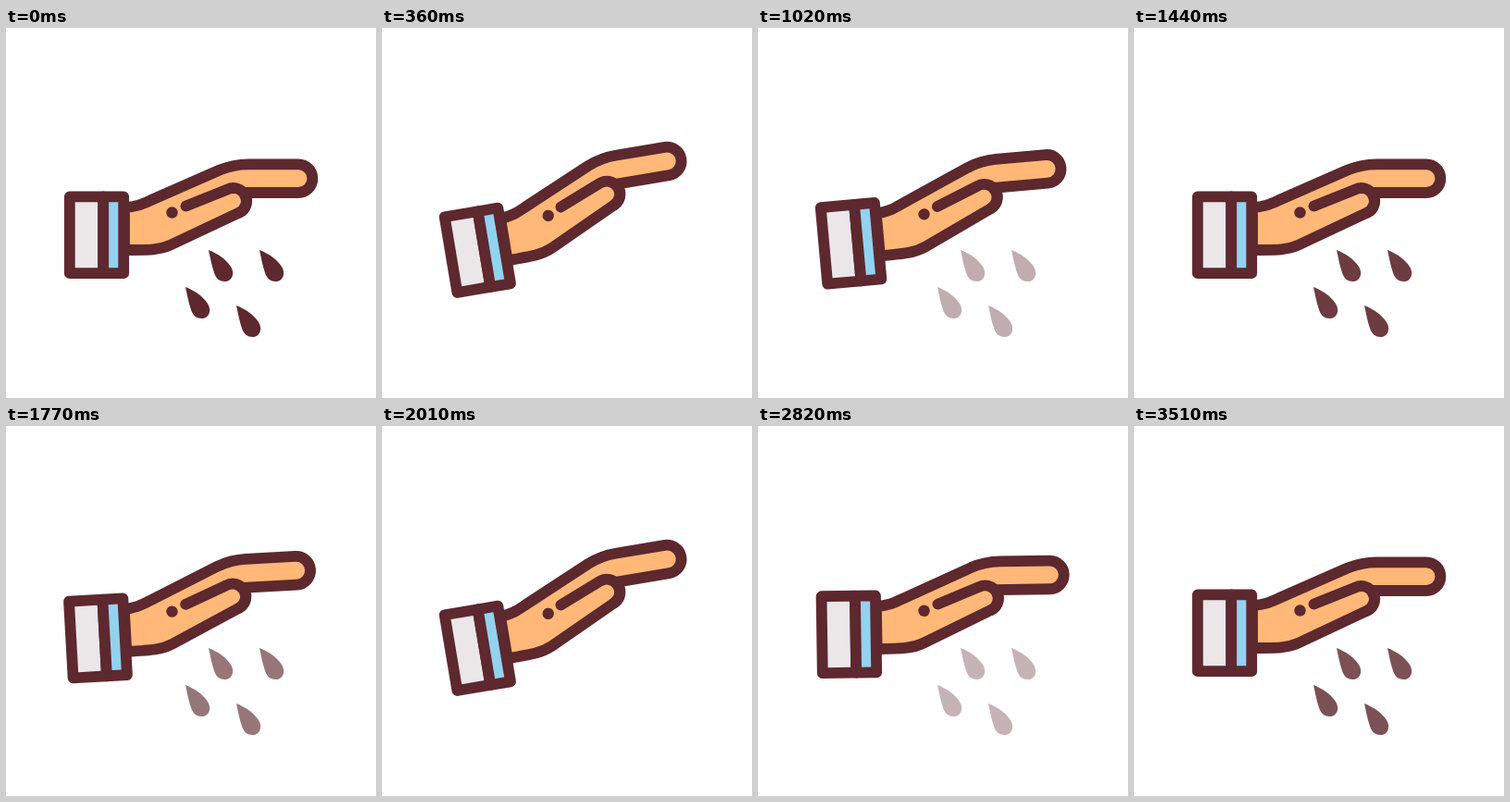
Recreate the animation shown at these times as an HTML page. Size 400 by 400 pixels, loop 3600 ms.

```html
<!DOCTYPE html>
<html lang="en">
<head>
<meta charset="utf-8">
<title>Sowing hand</title>
<style>
  html, body { margin: 0; width: 100%; height: 100%; overflow: hidden; background: #fff; }
  svg { display: block; width: 100vw; height: 100vh; }
  #hand { fill: none; stroke: #5d282e; stroke-width: 11.8; stroke-linecap: round; stroke-linejoin: round; }
  #seeds, #hand circle { fill: #5d282e; }
</style>
</head>
<body>
<svg viewBox="0 0 400 400">
  <defs>
    <path id="seed" d="M0 0C10 4 19 10 24 18C29 26 25 34 17.5 34C12 34 8.500 31 6.500 26C3.500 18 2 9 0 0Z"/>
  </defs>
  <g id="seeds">
    <use href="#seed" x="219" y="240"/>
    <use href="#seed" x="274" y="240"/>
    <use href="#seed" x="194" y="280"/>
    <use href="#seed" x="249" y="300"/>
  </g>
  <g id="hand">
    <path fill="#ffb877" d="M128 194C141 193.500 148 190 157 186L231 153.500C242 149 252 147.300 262 147.300H316A15.300 15.300 0 0 1 316 178H257A14 14 0 0 1 252 199.700L178 234.500C166 240 156 240 128 240Z"/>
    <path d="M194.500 192.500L239.500 174.500A14 14 0 0 1 252 199.700"/>
    <circle cx="179.500" cy="199.500" r="6.200" stroke="none"/>
    <path fill="#ebe7e9" d="M68.800 182.300H105.200V265.200H68.800Z"/>
    <path fill="#92d3f0" d="M105.200 182.300H127.200V265.200H105.200Z"/>
  </g>
</svg>
<script>
  const LOOP = 3600, STEP = 30, FIRST_HOLD = 60, LAST = 3510;
  const LIFT = 625, LOWER = 575, ANGLE = 16.5, FADE_OUT = 330;
  const hand = document.getElementById("hand");
  const seeds = document.getElementById("seeds");

  // Two throws; the seeds return more slowly after the second
  const throws = [
    { start: 0, back: 720, rise: 800 },
    { start: 1650, back: 645, rise: 1510 }
  ];

  const clamp = x => Math.min(1, Math.max(0, x));

  function draw(now) {
    const step = Math.floor((now % LOOP) / STEP) * STEP;
    const time = step < FIRST_HOLD ? 0 : Math.min(step, LAST);
    const { start, back, rise } = throws[time < throws[1].start ? 0 : 1];
    const t = time - start;

    const lift = clamp(Math.min(t / LIFT, (LIFT + LOWER - t) / LOWER));
    const opacity = clamp(Math.max(1 - t / FADE_OUT, (t - back) / rise));
    hand.setAttribute("transform", `rotate(${-ANGLE * lift} 200 200)`);
    seeds.setAttribute("opacity", opacity);
  }

  const begin = performance.now();
  function tick() {
    draw(performance.now() - begin);
    requestAnimationFrame(tick);
  }
  tick();
</script>
</body>
</html>
```
